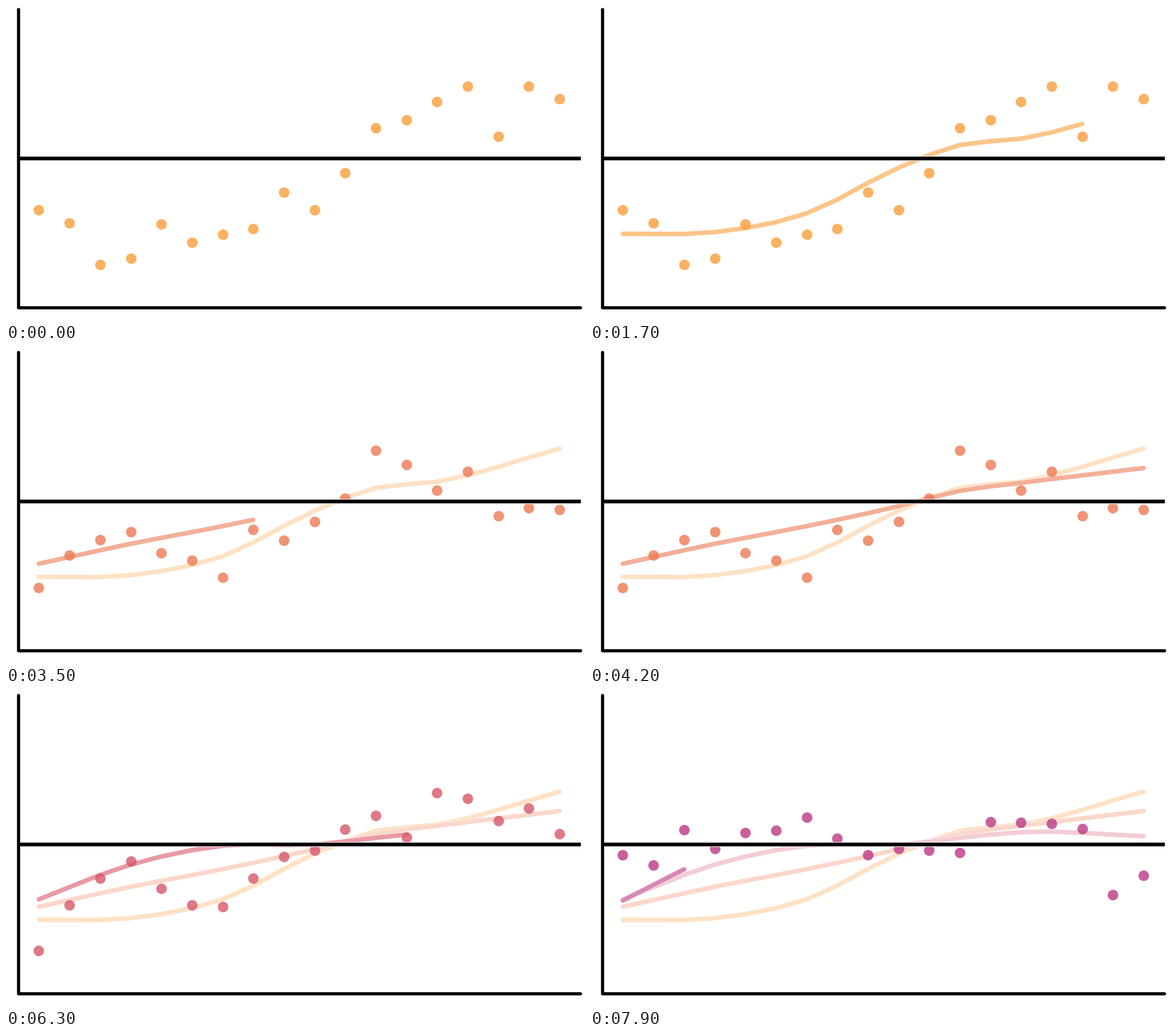
These frames come from a looping animation (1013 px wide and 553 px high, 8000 ms). A matplotlib script:

```python
import numpy as np
import matplotlib.pyplot as plt
from matplotlib.animation import FuncAnimation
from matplotlib.colors import to_rgb

W, H, DPI = 1013, 553, 64
PX = 72 / DPI              # points per pixel
STEP_MS, FRAMES = 100, 80
ROUND_FRAMES = 24          # one set of dots and its curve
WAIT, DRAW = 6, 13         # still frames, then frames of curve growth

INDEX = np.arange(18)
X = np.linspace(57.5, 970, len(INDEX))
KEYS = np.array([0, 3, 6, 9, 11, 13, 17])

# Per round: colour, curve heights and dot heights at the key indices.
ROUNDS = [
    ("#fa9e3b", [400, 397, 364, 284, 244, 233, 175],
     [358, 443, 401, 358, 214, 168, 163]),
    ("#ed7953", [377, 342, 311, 276, 249, 235, 209],
     [419, 321, 401, 303, 178, 248, 282]),
    ("#d8576b", [364, 303, 270, 268, 256, 246, 253],
     [454, 297, 377, 278, 217, 177, 249]),
    ("#bd3786", [366, 284],
     [286, 275, 220, 275, 282, 229, 322]),
]


def smooth(heights):
    """Cubic Hermite curve through the key heights, one value per index."""
    keys = KEYS[:len(heights)]
    slopes = np.gradient(np.array(heights, float), keys)
    seg = np.clip(np.searchsorted(keys, INDEX, "right") - 1, 0, len(keys) - 2)
    span = np.diff(keys)[seg]
    t = (INDEX - keys[seg]) / span
    start, end = np.take(heights, seg), np.take(heights, seg + 1)
    ease = t * t * (3 - 2 * t)
    bend = t * (1 - t) * (slopes[seg] * (1 - t) - slopes[seg + 1] * t)
    return start + (end - start) * ease + span * bend


def scatter_heights(heights, rng):
    """Key dots stay put; the dots between them stray from the joining line."""
    stray = rng.normal(0, 28, len(INDEX))
    stray[KEYS] = 0
    return np.clip(np.interp(INDEX, KEYS, heights) + stray, 141, 454)


def on_white(color, alpha):
    return 1 - alpha * (1 - np.array(to_rgb(color)))


def stroke(xs, ys, color, width, cap="round", z=1):
    line, = ax.plot(xs, ys, color=color, lw=width * PX, solid_capstyle=cap,
                    solid_joinstyle="round", snap=False, zorder=z)
    return line


def visible_points(k):
    """Number of curve points shown k frames after its start."""
    if k < 0:
        return 0
    return len(X) if k >= DRAW - 1 else int(2 + 1.33 * k)


rng = np.random.default_rng(4)
colors = [color for color, _, _ in ROUNDS]
curves = [smooth(heights) for _, heights, _ in ROUNDS]
dot_heights = [scatter_heights(heights, rng) for _, _, heights in ROUNDS]

fig = plt.figure(figsize=(W / DPI, H / DPI), dpi=DPI, facecolor="white")
ax = fig.add_axes([0, 0, 1, 1])
ax.set(xlim=(0, W), ylim=(H, 0))
ax.axis("off")

# Each curve sits on a slightly wider white one, which leaves a thin rim.
lines = [(stroke([], [], "white", 9, z=1 + i),
          stroke([], [], color, 8, z=1.5 + i))
         for i, color in enumerate(colors)]

dots = ax.scatter(X, dot_heights[0], s=(18.5 * PX) ** 2, linewidths=0,
                  alpha=0.8, zorder=6)

stroke([22, 1007], [267.7, 267.7], "white", 8.5, "butt", 7)
stroke([22, 1007.5], [267.7, 267.7], "black", 6.5, "butt", 8)
stroke([22, 22, 1007], [6, 529.8, 529.8], "black", 5.5, z=8)


def draw(frame):
    current, phase = divmod(frame, ROUND_FRAMES)
    dots.set_offsets(np.column_stack([X, dot_heights[current]]))
    dots.set_facecolor(colors[current])
    for i, (rim, line) in enumerate(lines):
        n = 0
        if i < current:
            n = len(X)
        elif i == current:
            n = visible_points(phase - WAIT)
        for part in (rim, line):
            part.set_data(X[:n], curves[i][:n])
        line.set_color(on_white(colors[i], 0.6 if i == current else 0.3))
    return [dots, *(part for pair in lines for part in pair)]


anim = FuncAnimation(fig, draw, frames=FRAMES, interval=STEP_MS,
                     repeat=True, repeat_delay=0, blit=False)
plt.show()
```
